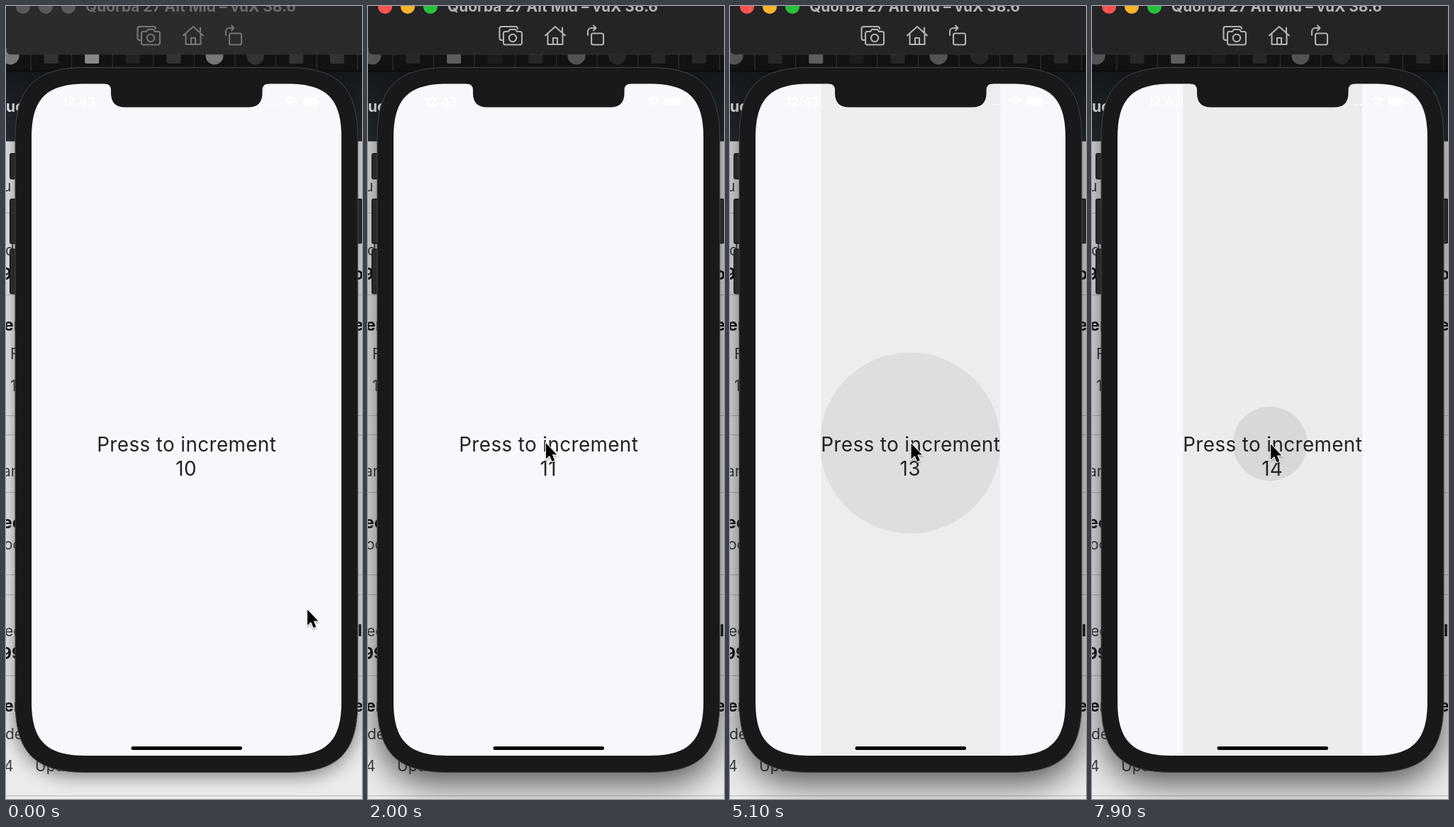
Write an HTML page that moves like this. It is 502 by 1116 pixels and loops after 8000 ms.

```html
<!DOCTYPE html>
<html lang="en">
<head>
<meta charset="utf-8">
<title>Press to increment</title>
<style>
  html, body { margin: 0; width: 100%; height: 100%; overflow: hidden; background: #e6e6e6; }
  svg { display: block; width: 100vw; height: 100vh; font-family: Inter, Roboto, sans-serif; }
  .bold { font-weight: 700; fill: #19191b; }
  #bar { fill: #2b2a2c; }
  #lights circle { fill: #59585b; }
  #title { fill: #6b6a6d; font-weight: 700; }
  #tools { fill: none; stroke: #757477; stroke-width: 2.1; stroke-linejoin: round; stroke-linecap: round; }
  #shade { opacity: .48; filter: url(#soft); }
  .active #bar { fill: #242326; }
  .active #lights :nth-child(1) { fill: #ff544f; }
  .active #lights :nth-child(2) { fill: #ffb42b; }
  .active #lights :nth-child(3) { fill: #27c23b; }
  .active #title { fill: #b3b2b4; }
  .active #tools { stroke: #b3b2b4; }
  .active #favicons { opacity: .65; }
  .active #shade { opacity: .62; filter: url(#deep); }
</style>
</head>
<body>
<svg id="stage" viewBox="0 0 502 1116">
  <defs>
    <filter id="soft" x="-30%" y="-30%" width="160%" height="160%"><feGaussianBlur stdDeviation="13"/></filter>
    <filter id="deep" x="-30%" y="-30%" width="160%" height="160%"><feOffset dy="12"/><feGaussianBlur stdDeviation="23"/></filter>
    <filter id="drop" x="-50%" y="-50%" width="200%" height="200%"><feDropShadow dx="0" dy="1.5" stdDeviation="1.3" flood-opacity=".4"/></filter>
    <linearGradient id="navy" x2="0" y2="1"><stop stop-color="#14181c"/><stop offset="1" stop-color="#272e34"/></linearGradient>
    <clipPath id="screen"><path id="glass"/></clipPath>
    <clipPath id="well"><rect x="128.500" y="109" width="252.500" height="947"/></clipPath>
  </defs>

  <!-- page behind the phone -->
  <rect y="190" width="502" height="926" fill="#ebebec"/>
  <g id="page" font-size="21" fill="#404145"></g>
  <rect y="92" width="502" height="98.500" fill="url(#navy)"/>
  <text x="0" y="149" font-size="21" font-weight="700" fill="#e4e4e6">uc</text>
  <rect id="shade" x="13" y="96" width="483" height="987" rx="78"/>
  <rect width="502" height="92" fill="#121213"/>
  <g id="favicons"></g>
  <path id="tabs" stroke="#343435" fill="none"/>
  <path d="M0 91.500H502" stroke="#040405"/>

  <!-- title bar -->
  <path id="bar" d="M1 -5H502V68H7Q1 68 1 62Z" stroke="#3c3b3d" stroke-width=".7"/>
  <g id="lights"><circle cx="24" cy="1" r="10"/><circle cx="56" cy="1" r="10"/><circle cx="88" cy="1" r="10"/></g>
  <text id="title" x="112" y="8" font-size="20.900">Quorba 27 Alt Mid – vuX 38.6</text>
  <g id="tools">
    <path d="M190 48h-1.500a3 3 0 0 1-3-3V32a3 3 0 0 1 3-3H208a3 3 0 0 1 3 3"/>
    <path d="M193.500 36H198l2-3h8l2 3h4.500a2.500 2.500 0 0 1 2.500 2.500V52a2.500 2.500 0 0 1-2.500 2.500h-21A2.500 2.500 0 0 1 191 52V38.500a2.500 2.500 0 0 1 2.500-2.500Z"/>
    <circle cx="204" cy="45" r="5.200"/>
    <path d="M250 41.500L264 29L278 41.500M253.500 39.500V54H274.500V39.500M274 37V30.500M261 53.500V45H267V53.500"/>
    <rect x="315" y="38.500" width="17" height="16" rx="2.500"/>
    <path d="M310 41V36a5 5 0 0 1 5-5H321M318 27.500L321.500 31L318 34.500"/>
  </g>

  <!-- phone -->
  <g fill="#29292a" stroke="#101011">
    <rect x="5.500" y="207.500" width="10" height="36" rx="2"/>
    <rect x="5.500" y="271.500" width="10" height="63" rx="2"/>
    <rect x="5.500" y="342" width="10" height="63" rx="2"/>
    <rect x="492" y="271.500" width="10" height="62.500" rx="2"/>
  </g>
  <path id="body" fill="#19181b" stroke="#454447"/>
  <g clip-path="url(#screen)">
    <rect x="36" y="109" width="437" height="947" fill="#f8f7fb"/>
    <g clip-path="url(#well)">
      <rect id="glow" x="128" y="109" width="253" height="947" fill="#bcbcbc"/>
      <circle id="splash"/>
    </g>
    <g fill="#fff">
      <text x="79" y="141" font-size="17.500" font-weight="600">12:43</text>
      <path d="M370 138h2v2h-2zM374 138h2v2h-2zM378 138h2v2h-2z"/>
      <path d="M394 132q8.500-8 17 0l-2 2q-6.500-6-13 0zM397.500 135.500q5-4.500 10 0l-5 5z"/>
      <rect x="418" y="129" width="22" height="11.500" rx="3.500"/><rect x="441.500" y="132.500" width="1.500" height="4.500"/>
    </g>
    <g font-size="27.800" letter-spacing=".4" fill="#222124" text-anchor="middle">
      <text x="254.700" y="627.300">Press to increment</text>
      <text id="count" x="254.200" y="661">10</text>
    </g>
    <rect x="176.500" y="1042" width="156.500" height="5" rx="2.500" fill="#050506"/>
  </g>
  <path d="M139 108.500V109.500q9 0 9 9V122.500q0 20 20 20H341.500q20 0 20-20V118.500q0-9 9-9V108.500Z" fill="#19181b"/>
  <path id="cursor" d="M1 1.500v22l5-4.700l3.600 8.200l3.600-1.500l-3.400-8h6.500z" stroke="#fff" stroke-width="2" paint-order="stroke" filter="url(#drop)"/>
</svg>

<script>
const $ = id => document.getElementById(id);
const LOOP = 8000, STEP = 100;

// Rectangle with smoothly curving corners that reach e along each side.
function smoothRect(x, y, w, h, e) {
  const c = .725 * e, f = e - c, W = w - 2 * e, H = h - 2 * e;
  return `M${x + e} ${y}h${W}c${c} 0 ${e} ${f} ${e} ${e}v${H}c0 ${c} ${-f} ${e} ${-e} ${e}` +
    `h${-W}c${-c} 0 ${-e} ${-f} ${-e} ${-e}v${-H}c0 ${-c} ${f} ${-e} ${e} ${-e}z`;
}
$('body').setAttribute('d', smoothRect(13, 86.5, 483, 992, 100));
$('glass').setAttribute('d', smoothRect(36, 109.5, 437, 945.5, 76));

// [x, baseline, text, bold]
const scraps = [
  [-5, 261, 'u'], [-1, 351, 'd'], [-7, 385, '9', 1], [-3, 457, 'er', 1], [6, 497, 'F'], [6, 542, '1'],
  [-5, 662, 'ar'], [-5, 735, 'ec', 1], [-3, 765, 'oc'], [-2, 887, 'ec'], [-7, 919, '99', 1],
  [-3, 993, 'er', 1], [-1, 1032, 'de'], [-3, 1077, '4'], [41, 1077, 'Upd'],
  [490, 385, 'o', 1], [490, 457, 'e', 1], [496, 887, 'l', 1], [490, 993, 'e', 1]
];
const rules = [291, 406, 576, 603, 684, 800, 828, 942, 1111];
$('page').innerHTML =
  rules.map(y => `<path d="M0 ${y}.5H502" stroke="#b9b9bb"/>`).join('') +
  scraps.map(([x, y, s, b]) => `<text x="${x}" y="${y}"${b ? ' class="bold" font-size="23"' : ''}>${s}</text>`).join('');

// one grey per tab icon
let tabs = '', icons = '';
[...'738237333'].forEach((g, i) => {
  const x = 6 + i * 57.6, fill = `fill="#${g + g + g}"`;
  tabs += `M${x + 29} 68V91`;
  icons += [0, 5, 6].includes(i)
    ? `<circle cx="${x}" cy="70" r="12.5" ${fill}/>`
    : `<rect x="${x - 10}" y="61" width="20" height="20" rx="2" ${fill}/>`;
});
$('tabs').setAttribute('d', tabs);
$('favicons').innerHTML = icons;

const ACTIVATE = 1500;
// press time, release time, place
const taps = [
  [1568, 1718, 248, 612], [3210, 3305, 256, 618], [4906, 5046, 254, 615],
  [6196, 6310, 253, 622.5], [7799, 9000, 251, 616]
];
// time, tip of the pointer
const route = [
  [0, 424, 848], [50, 424, 848], [900, 250, 636], [950, 250, 636], [1300, 247.5, 611], [1850, 247.5, 611],
  [2300, 257, 622], [2350, 257, 622], [2500, 256.5, 618], [3850, 256.5, 618], [4100, 254.5, 614],
  [5300, 254.5, 614], [6200, 253, 621.5], [6750, 253, 621.5], [7100, 251, 615], [LOOP, 251, 615]
];

const clamp = v => Math.max(0, Math.min(1, v));
const set = (el, attrs) => { for (const k in attrs) el.setAttribute(k, attrs[k]); };

function pointer(t) {
  const i = route.findIndex(p => p[0] > t);
  const [t0, x0, y0] = route[i - 1], [t1, x1, y1] = route[i];
  const u = (t - t0) / (t1 - t0), e = u * u * (3 - 2 * u);
  return [x0 + (x1 - x0) * e, y0 + (y1 - y0) * e];
}

// The splash grows slowly while held, faster once released; both layers fade in 200 ms.
function ripple(t) {
  const tap = taps.filter(p => p[0] <= t).pop();
  if (!tap) return { r: 0, x: 0, y: 0, glow: 0, ink: 0 };
  const [down, up, x, y] = tap;
  const held = Math.min(t, up) - down, freed = Math.max(0, t - up);
  return {
    x, y,
    r: .517 * held + 1.02 * freed,
    glow: clamp(clamp(held / 200) - freed / 200),
    ink: clamp(1 - freed / 200)
  };
}

function draw(t) {
  $('stage').classList.toggle('active', t >= ACTIVATE);
  $('cursor').setAttribute('transform', `translate(${pointer(t)})`);
  const { x, y, r, glow, ink } = ripple(t);
  set($('glow'), { opacity: .425 * glow });
  set($('splash'), { cx: x, cy: y, r, opacity: .085 * ink });
  $('count').textContent = 10 + taps.filter(p => p[1] <= t).length;
}

const start = performance.now();
function frame() {
  const t = (performance.now() - start) % LOOP;
  draw(Math.floor(t / STEP) * STEP);
  requestAnimationFrame(frame);
}
frame();
</script>
</body>
</html>
```
